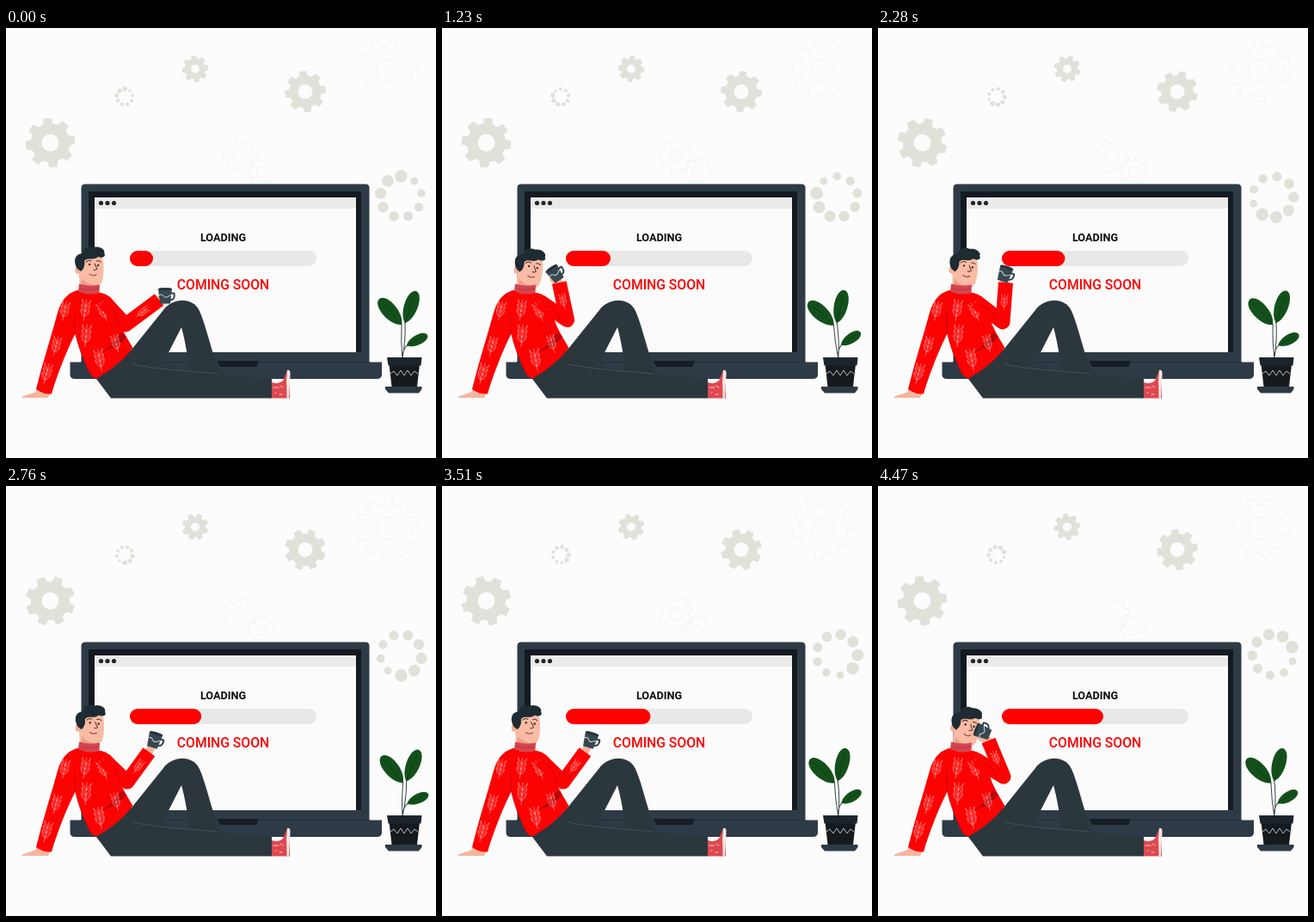
Write an HTML page that moves like this. It is 500 px wide and 500 px high and loops after 4.5 s.

```html
<!DOCTYPE html>
<html lang="en">
<head>
<meta charset="utf-8">
<title>Coming soon</title>
<style>
html, body { margin: 0; width: 100%; height: 100%; overflow: hidden; background: #fcfcfc; }
svg { display: block; width: 100vw; height: 100vh; }
text { font-family: Roboto, "Liberation Sans", sans-serif; text-anchor: middle; }
.line { fill: none; stroke-linecap: round; stroke-linejoin: round; }
.sprig { fill: none; stroke: #ffb3ac; stroke-width: .65; stroke-linecap: round; }
</style>
</head>
<body>
<svg viewBox="0 0 500 500">
  <g id="gears"></g>
  <g id="loaders" fill="#e1e1da"></g>

  <g id="laptop">
    <path d="M92 181.500H418Q422.500 181.500 422.500 186V389H87.500V186Q87.500 181.500 92 181.500Z" fill="#2e3b46"/>
    <path d="M74.500 388.500H437V403Q437 408 431 408H80Q74.500 408 74.500 403Z" fill="#2e3b46"/>
    <path d="M87 388.500H423" stroke="#22303a"/>
    <path d="M246 387H294L291 394H249Z" fill="#161d24"/>
    <rect x="96" y="190" width="317" height="188" fill="#141a21"/>
    <rect x="103" y="197" width="304" height="180" fill="#fbfbfb"/>
    <rect x="103" y="197" width="304" height="13" fill="#ebeae8"/>
    <path d="M103 377.500H413" stroke="#3d4952" stroke-width=".8"/>
    <g fill="#20262d">
      <circle cx="110.500" cy="203.500" r="2.600"/><circle cx="118" cy="203.500" r="2.600"/><circle cx="125.500" cy="203.500" r="2.600"/>
    </g>
    <text x="252.500" y="248.400" font-size="12.700" font-weight="700" fill="#0b0b0b">LOADING</text>
    <rect x="144" y="259" width="217" height="18" rx="9" fill="#e8e8e8"/>
    <rect id="bar" x="144" y="259" width="27" height="18" rx="9" fill="#f00"/>
    <text x="252.500" y="303.600" font-size="15.700" font-weight="500" fill="#f00">COMING SOON</text>
  </g>

  <g id="plant"></g>
  <g id="pot">
    <path d="M445.500 391H481L478 417H448.500Z" fill="#151a1f"/>
    <path d="M443 383H483.500L482.500 392.500H444.500Z" fill="#1d252c"/>
    <path d="M441 417H483.500V420L480 424.500H445L441 420Z" fill="#2d3a43"/>
    <path class="line" d="M447 402L451 399L455 404L459 398L463 404L467 398L471 404L475 399L479 402" stroke="#c5cbcd" stroke-width=".9"/>
  </g>

  <g id="legs">
    <path d="M104 404L146 374L183 328C193 314 217 312 225 329C233 347 239 377 249 402L214 401C211 380 208 362 204 348L182 391L180 400L120 420Z" fill="#2b373d"/>
    <path d="M102 404L146 388C180 393 215 399 245 402L309 408V430.500H122Z" fill="#2b373d"/>
    <path class="line" d="M147 391C175 397 215 399 246 402" stroke="#4b585e" stroke-width=".8"/>
    <path d="M309 412Q317 415 322 410L327 398L330 399L330 430.500H309Z" fill="#dd4850"/>
    <path d="M327 398Q331 397 330.500 403L329 430.500H326.500Q326.500 418 326 411Z" fill="#f6e7e4"/>
    <path class="line" d="M311 418H317M313 424H314M319 416L322 418M318 426H321" stroke="#ffc4c0" stroke-width="1"/>
  </g>

  <g id="body">
    <path d="M36 420L52 423L49 430H19Q17 429 22 427.500Q29 425 34 423.500Z" fill="#f6b59d"/>
    <path d="M85 305C98 309 108 306 114 309C126 313 130 326 131 340C135 352 142 362 147.500 372C137 386 121 399 105 407.500Q100 406 97 401C90 387 84 369 80 352Z" fill="#fc0303"/>
    <path d="M86 304.500C74 306 65 314 60 331C53 357 42 391 35 420Q43 426 53 425.500C58 408 66 387 74 369L84 348Z" fill="#fc0303"/>
    <path class="line" d="M80 331Q79 345 80 353Q85 376 98 402" stroke="#c70208" stroke-width=".8"/>
    <path d="M111 377Q124 370 134 354L140 359Q130 372 111 377Z" fill="#b8040a"/>
    <g id="sprigs" class="sprig"></g>
  </g>

  <g id="head">
    <path d="M85 266Q98 260 111 264Q114.500 275 113 288Q112.500 297 108 299V302H86L84.500 284Z" fill="#f9bba3"/>
    <path d="M88 291Q94 298 105 299L87 300Z" fill="#ec9f88"/>
    <ellipse cx="83.500" cy="281" rx="3.300" ry="4.500" fill="#f4ae95"/>
    <path d="M83 280C78 272 79 263 89 262C88 256 96 253 102 255C109 253 116 258 114 262C117 266 111 268 107 266C101 271 95 266 91 271C92 276 90 281 87 283Z" fill="#1e2b32"/>
    <path class="line" d="M93 272Q96 269 99 271M105 271Q108 270 110 272M103 274Q105 279 106 280Q104 282 102 281" stroke="#53322f" stroke-width="1"/>
    <circle cx="97" cy="275" r="1.200" fill="#28292e"/><circle cx="107" cy="276" r="1.200" fill="#28292e"/>
    <path class="line" d="M97 286Q101 289 105 286.500" stroke="#823f38" stroke-width="1"/>
  </g>
  <path d="M85 297.500Q97 301 109 298.500L108.500 308Q96 312 84 306Z" fill="#d5454f"/>
  <path class="line" d="M86 303Q97 306 107 303" stroke="#a8343e" stroke-width=".7"/>

  <g id="arm">
    <path id="palm" class="line" stroke="#f6b59d" stroke-width="9"/>
    <path id="sleeve" class="line" stroke="#fc0303" stroke-width="17" style="stroke-linecap:butt"/>
    <path id="crease" class="line" stroke="#c70208" stroke-width=".8"/>
    <g id="armSprig" class="sprig"></g>
    <g id="cup">
      <path class="line" d="M7 -3H10.500Q12 4 6 5" stroke="#33434c" stroke-width="2"/>
      <path d="M-8 -8H8L6 9H-6Z" fill="#37474f"/>
      <ellipse cx="0" cy="-8" rx="8" ry="1.600" fill="#24313a"/>
      <path class="line" d="M-7 -1Q-4 -3 -2 0T3 1T7 -1" stroke="#cfd8dc" stroke-width="1"/>
    </g>
  </g>
</svg>
<script>
const $ = id => document.getElementById(id);
const TAU = Math.PI * 2, LOOP = 4500, STEP = 30;
const n2 = v => v.toFixed(2);

function add(parent, tag, attrs) {
  const el = document.createElementNS("http://www.w3.org/2000/svg", tag);
  for (const k in attrs) el.setAttribute(k, attrs[k]);
  return parent.appendChild(el);
}
const set = (el, key, val) => el.setAttribute(key, val);

function gearPath(r, teeth, hole) {
  const root = r * .78, pts = [];
  for (let i = 0; i < teeth; i++)
    for (const [a, q] of [[-.31, root], [-.19, r], [.19, r], [.31, root]]) {
      const w = (i + a) * TAU / teeth;
      pts.push(n2(q * Math.cos(w)) + " " + n2(q * Math.sin(w)));
    }
  return `M${pts.join("L")}ZM${hole} 0A${hole} ${hole} 0 1 0 ${-hole} 0A${hole} ${hole} 0 1 0 ${hole} 0Z`;
}

// x, y, radius, teeth, hole, outline only
const gears = [
  [51.5, 133.5, 28.5, 8, 10.5, 0],
  [220, 47.5, 15, 8, 5.5, 0],
  [348, 74, 23.5, 8, 9, 0],
  [443.5, 49.5, 36, 10, 13, 1],
  [272, 149, 20, 8, 7.5, 1],
  [297, 167, 16, 8, 6, 1]
].map(([x, y, r, teeth, hole, thin]) => ({
  x, y,
  el: add($("gears"), "path", {
    d: gearPath(r, teeth, hole), "fill-rule": "evenodd", "stroke-linejoin": "round",
    fill: thin ? "none" : "#e1e1da",
    stroke: thin ? "#f1f1ef" : "#e1e1da", "stroke-width": thin ? .8 : 1
  })
}));

// Rings of nine dots, shrinking anticlockwise from the largest
const loaders = [[459.3, 196.3, 1], [138, 80, .385]].map(([x, y, k]) => {
  const el = add($("loaders"), "g", {});
  for (let i = 0; i < 9; i++) {
    const a = -(90 + i * 40) * TAU / 360;
    add(el, "circle", { cx: n2(24 * k * Math.cos(a)), cy: n2(24 * k * Math.sin(a)), r: n2((7.3 - i * .35) * k) });
  }
  return { x, y, el };
});

function leaf(x, y, u, v, w) {
  const p = (f, s) => n2(x + (u - x) * f - (v - y) * s) + " " + n2(y + (v - y) * f + (u - x) * s);
  add($("plant"), "path", { d: `M${x} ${y}C${p(.2, w)} ${p(.98, w)} ${u} ${v}C${p(.98, -w)} ${p(.2, -w)} ${x} ${y}`, fill: "#14501b" });
  add($("plant"), "path", { d: `M${x} ${y}L${p(.85, 0)}`, class: "line", stroke: "#0a3a12", "stroke-width": .7 });
}
add($("plant"), "path", { d: "M461 386Q459 365 460 344M461 384Q465 362 464 341M461 384Q461 372 468 368", class: "line", stroke: "#37464a", "stroke-width": 1 });
leaf(460, 345, 434, 315, .29);
leaf(464, 343, 477, 306, .27);
leaf(466, 369, 490, 357, .29);

function sprig(parent, x, y, turn, k) {
  let d = "M0 15L0 -15";
  for (const y0 of [9, 2, -5])
    for (const s of [-1, 1])
      d += `M0 ${y0}C${s * 2} ${y0 - 7} ${s * 6} ${y0 - 6} ${s * 6} ${y0 - 10}C${s * 6} ${y0 - 4} ${s * 3} ${y0} 0 ${y0}`;
  return add(parent, "path", { d, transform: `translate(${x} ${y}) rotate(${turn}) scale(${k})` });
}
for (const s of [[68, 329, 12, .75], [92, 328, 8, .8], [58, 370, 14, .75], [93, 358, 5, .85],
                 [47, 402, 15, .8], [109, 386, -10, .85], [128, 367, -15, .7], [113, 330, -22, .75]])
  sprig($("sprigs"), ...s);
sprig($("armSprig"), 0, 0, 0, .6);

// reach, elbow x y, wrist x y, cup x y, cup turn
const poses = [
  [-.96, 146, 338, 128, 296, 121, 286, -70],
  [-.2, 145, 342, 149, 296, 148, 286, 20],
  [.34, 142, 343, 159, 301, 160, 287.5, 28],
  [.7, 141, 344, 166, 309, 172, 295, 17],
  [.96, 139, 345, 178, 316, 185, 311.5, 0]
];
function poseAt(c) {
  c = Math.max(-.96, Math.min(.96, c));
  let i = 0;
  while (i < poses.length - 2 && c > poses[i + 1][0]) i++;
  const a = poses[i], b = poses[i + 1], f = (c - a[0]) / (b[0] - a[0]);
  return a.map((v, j) => v + (b[j] - v) * f);
}

function drawArm(c) {
  const [, ex, ey, wx, wy, cx, cy, turn] = poseAt(c);
  set($("sleeve"), "d", `M114 318L${n2(ex)} ${n2(ey)}L${n2(wx)} ${n2(wy)}`);
  set($("palm"), "d", `M${n2(wx)} ${n2(wy)}L${n2(cx - 2)} ${n2(cy + 6)}`);
  set($("crease"), "d", `M121 323Q${n2(ex - 10)} ${n2(ey - 14)} ${n2(ex - 8)} ${n2(ey + 2)}`);
  set($("cup"), "transform", `translate(${n2(cx)} ${n2(cy)}) rotate(${n2(turn)})`);
  const dir = Math.atan2(wy - ey, wx - ex) * 360 / TAU + 90;
  set($("armSprig"), "transform", `translate(${n2((ex + wx) / 2)} ${n2((ey + wy) / 2)}) rotate(${n2(dir)})`);
}

function draw(t) {
  const s = t / 1000;
  set($("bar"), "width", n2(27 + t * .02036));
  for (const g of gears) set(g.el, "transform", `translate(${g.x} ${g.y}) rotate(${n2(10 * s - 7)})`);
  for (const l of loaders) set(l.el, "transform", `translate(${l.x} ${l.y}) rotate(${n2(-65.3 * s)})`);

  const sway = Math.cos((t - 360) / 2400 * TAU);
  set($("plant"), "transform", `rotate(${n2(5.3 * (sway - .59))} 461 385)`);

  const reach = Math.cos((t - 135) / 3000 * TAU), nod = (1 - reach) / 2;
  set($("head"), "transform", `translate(${n2(nod)} ${n2(nod * 2)}) rotate(${n2(nod * 9)} 97 300)`);
  drawArm(reach);
}

const start = performance.now();
function tick() {
  const t = (performance.now() - start) % LOOP;
  draw(Math.floor(t / STEP) * STEP);
  requestAnimationFrame(tick);
}
draw(0);
requestAnimationFrame(tick);
</script>
</body>
</html>
```
